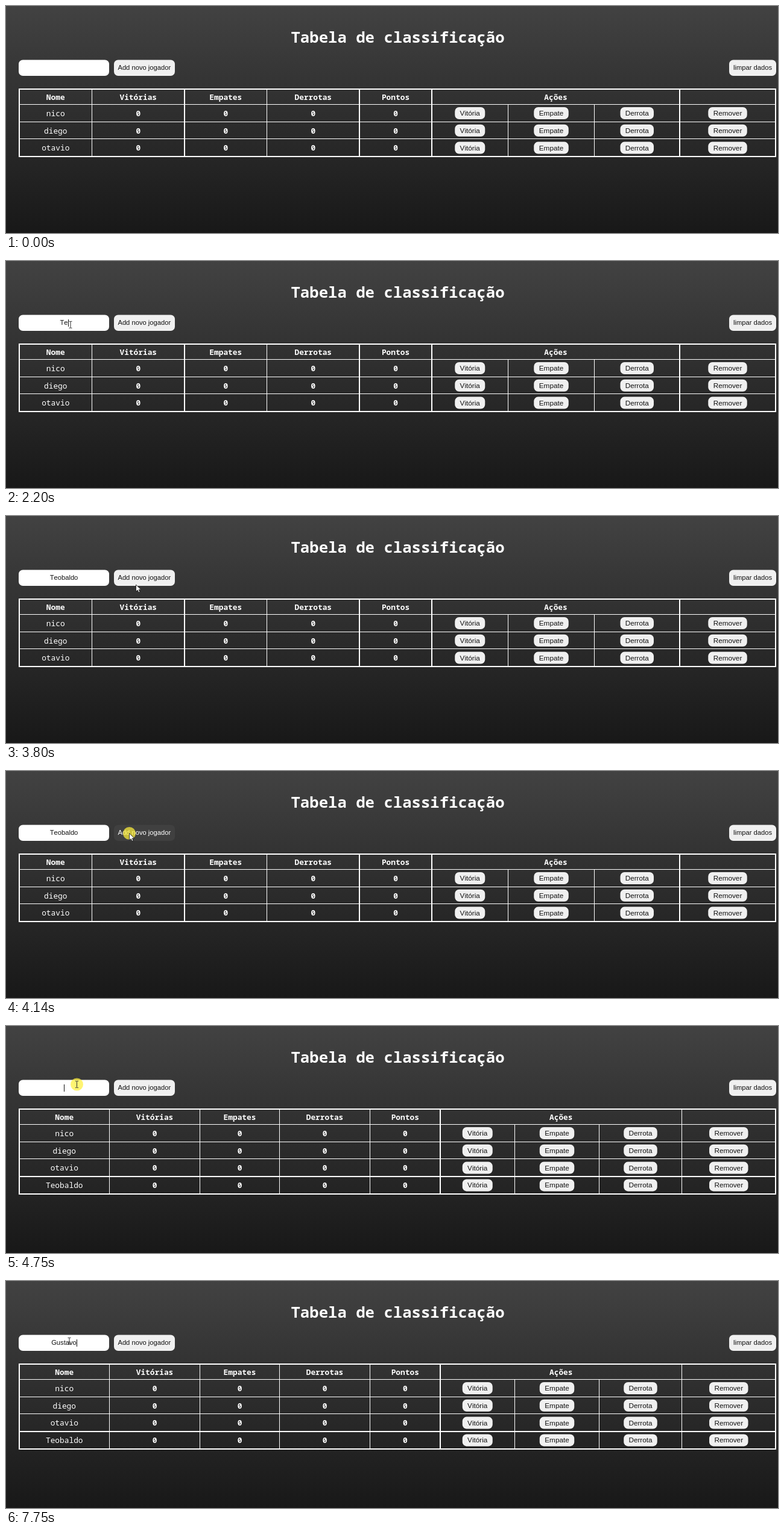
Recreate the animation shown at these times as an HTML page. Size 1280 px wide and 377 px high, loop 8 s.

```html
<!DOCTYPE html>
<html lang="pt">
<head>
<meta charset="utf-8">
<title>Tabela de classificação</title>
<style>
  html, body { margin: 0; width: 100%; height: 100%; overflow: hidden; background: #181818; }
  svg { display: block; width: 100%; height: 100%; }
  text { font-kerning: none; white-space: pre; }
  .mono { font-family: "Noto Sans Mono", monospace; font-size: 12.83px; font-weight: 500; fill: #fff; text-anchor: middle; }
  .bold { font-weight: 700; }
  .title { font-size: 25.66px; }
  .ui { font-family: "Liberation Sans", Arial, sans-serif; font-size: 11.2px; fill: #111; text-anchor: middle; }
  .cell { font-size: 11.75px; }
</style>
</head>
<body>
<svg id="stage" viewBox="0 0 1280 377" preserveAspectRatio="none">
  <defs>
    <linearGradient id="bg" x2="0" y2="1">
      <stop stop-color="#424242"/><stop offset="1" stop-color="#181818"/>
    </linearGradient>
  </defs>
  <rect width="1280" height="377" fill="url(#bg)"/>
</svg>
<script>
const LOOP = 8000;
const stage = document.getElementById('stage');

function add(parent, tag, attrs, text) {
  const node = document.createElementNS('http://www.w3.org/2000/svg', tag);
  for (const key in attrs) node.setAttribute(key, attrs[key]);
  if (text !== undefined) node.textContent = text;
  parent.append(node);
  return node;
}
const label = (parent, x, y, cls, text) => add(parent, 'text', { x, y, class: cls }, text);
const box = (parent, x, y, width, height, fill) =>
  add(parent, 'rect', { x, y, width, height, rx: 7, fill });

// Whole coordinates carry 2px rules, half coordinates 1px rules.
const rule = (parent, x1, y1, x2, y2, at) =>
  add(parent, 'line', { x1, y1, x2, y2, stroke: '#fff', 'stroke-width': at % 1 ? 1 : 2 });

const ROWS = [138, 163.5, 192.5, 220.5, 250, 279];
const HEADERS = ['Nome', 'Vitórias', 'Empates', 'Derrotas', 'Pontos'];
const ACTIONS = [['Vitória', 50], ['Empate', 57.5], ['Derrota', 55.5], ['Remover', 64.5]];

function makeTable(names, cols) {
  const g = add(stage, 'g', {});
  const bottom = ROWS[names.length + 1];
  const mid = (a, b = a + 1) => (cols[a] + cols[b]) / 2;

  ROWS.slice(0, names.length + 2).forEach(y => rule(g, 21, y, 1277, y, y));
  cols.forEach((x, i) => rule(g, x, i === 6 || i === 7 ? ROWS[1] : ROWS[0], x, bottom, x));
  HEADERS.forEach((text, i) => label(g, mid(i), 156, 'mono bold', text));
  label(g, mid(5, 8), 156, 'mono bold', 'Ações');

  names.forEach((name, row) => {
    const y = 178 + row * 28.8;
    label(g, mid(0), y + 4.8, 'mono', name);
    for (let i = 1; i < 5; i++) label(g, mid(i), y + 4.8, 'mono bold', '0');
    ACTIONS.forEach(([text, width], i) => {
      const x = mid(i + 5);
      box(g, x - width / 2, y - 10, width, 20, '#f0f0f0');
      label(g, x, y + 4, 'ui cell', text);
    });
  });
  return g;
}

label(stage, 649.5, 61, 'mono bold title', 'Tabela de classificação');
box(stage, 21, 89.5, 150, 26.5, '#fff');
const addButton = box(stage, 179, 89.5, 101, 26.5, '#f0f0f0');
const addLabel = label(stage, 229.3, 106, 'ui', 'Add novo jogador');
box(stage, 1199, 89.5, 78, 26.5, '#f0f0f0');
label(stage, 1238, 106, 'ui', 'limpar dados');

const players = ['nico', 'diego', 'otavio'];
const before = makeTable(players, [22, 142.5, 296, 432.5, 586, 706, 832.5, 975.5, 1117, 1276]);
const after = makeTable([...players, 'Teobaldo'],
  [22, 171.5, 321.5, 453.5, 603.5, 720, 843.5, 983.5, 1120.5, 1276]);

const typed = label(stage, 96, 106, 'ui', '');
const caret = add(stage, 'rect', { y: 97, width: 1, height: 12, fill: '#111' });
const halo = add(stage, 'circle', { r: 10.5, fill: '#fff03c', opacity: 0.72 });
const arrow = add(stage, 'path', {
  d: 'M0 0V11.5L2.7 9L4.5 13L6.5 12.1L4.8 8.3H8.3Z', fill: '#fff', stroke: '#111', 'stroke-width': 0.8
});
const beam = add(stage, 'path', {
  d: 'M-2.5 -5.5H-.8L0 -5L.8 -5.5H2.5M0 -5V5M-2.5 5.5H-.8L0 5L.8 5.5H2.5',
  fill: 'none', stroke: '#333', 'stroke-width': 1
});

// Each entry name comes with the time of every keystroke.
const ENTRIES = [
  { name: 'Teobaldo', keys: [1940, 2200, 2330, 2400, 2530, 2600, 2730, 2860], until: 4280 },
  { name: 'Gustavo', keys: [6430, 6560, 7020, 7480, 7550, 7690, 7750], until: LOOP }
];
const CARET_TOGGLES = [700, 1260, 1810, 3410, 3940, 4140, 4680, 5240, 5770, 6300, 6430];
const CLICKS = [[700, 840], [4140, 4280], [4680, 4820]];
const PATH = [
  [70, 230, 372], [400, 150, 190], [700, 108, 100.5], [840, 108, 100.5], [990, 107, 105.8],
  [3664, 107, 105.8], [3732, 165, 115], [3800, 215.5, 114], [4004, 204.5, 103.5],
  [4340, 204.5, 103.5], [4680, 117.5, 97], [4820, 117.5, 97], [4890, 105, 99.7], [LOOP, 105, 99.7]
];

function pointerAt(time) {
  const t = Math.max(70, 60 + Math.floor((time - 60) / 68) * 68);
  const i = PATH.findIndex(p => p[0] > t);
  const [t0, x0, y0] = PATH[i - 1], [t1, x1, y1] = PATH[i];
  const k = (t - t0) / (t1 - t0);
  return [x0 + (x1 - x0) * k, y0 + (y1 - y0) * k];
}
const show = (node, visible) => node.setAttribute('visibility', visible ? 'visible' : 'hidden');
const inside = (x, y, left, right, bottom) => x > left && x < right && y > 89 && y < bottom;

function draw(t) {
  const added = t >= 4280;
  show(before, !added);
  show(after, added);

  const entry = ENTRIES.find(e => t < e.until);
  typed.textContent = entry.name.slice(0, entry.keys.filter(k => t >= k).length);
  const width = typed.textContent ? typed.getComputedTextLength() : 0;
  caret.setAttribute('x', Math.round(96 + width / 2));
  show(caret, CARET_TOGGLES.filter(k => t >= k).length % 2);

  const [x, y] = pointerAt(t);
  const overInput = inside(x, y, 21, 171, 116);
  const overAdd = inside(x, y, 179, 280, 113);
  const move = `translate(${x} ${y})`;
  [arrow, beam, halo].forEach(node => node.setAttribute('transform', move));
  show(arrow, t >= 70 && !overInput);
  show(beam, t >= 70 && overInput);
  show(halo, CLICKS.some(([from, to]) => t >= from && t < to));
  addButton.setAttribute('fill', overAdd ? '#404040' : '#f0f0f0');
  addLabel.style.fill = overAdd ? '#fff' : '#111';
}

const start = performance.now();
function tick() {
  draw((performance.now() - start) % LOOP);
  requestAnimationFrame(tick);
}
tick();
</script>
</body>
</html>
```
